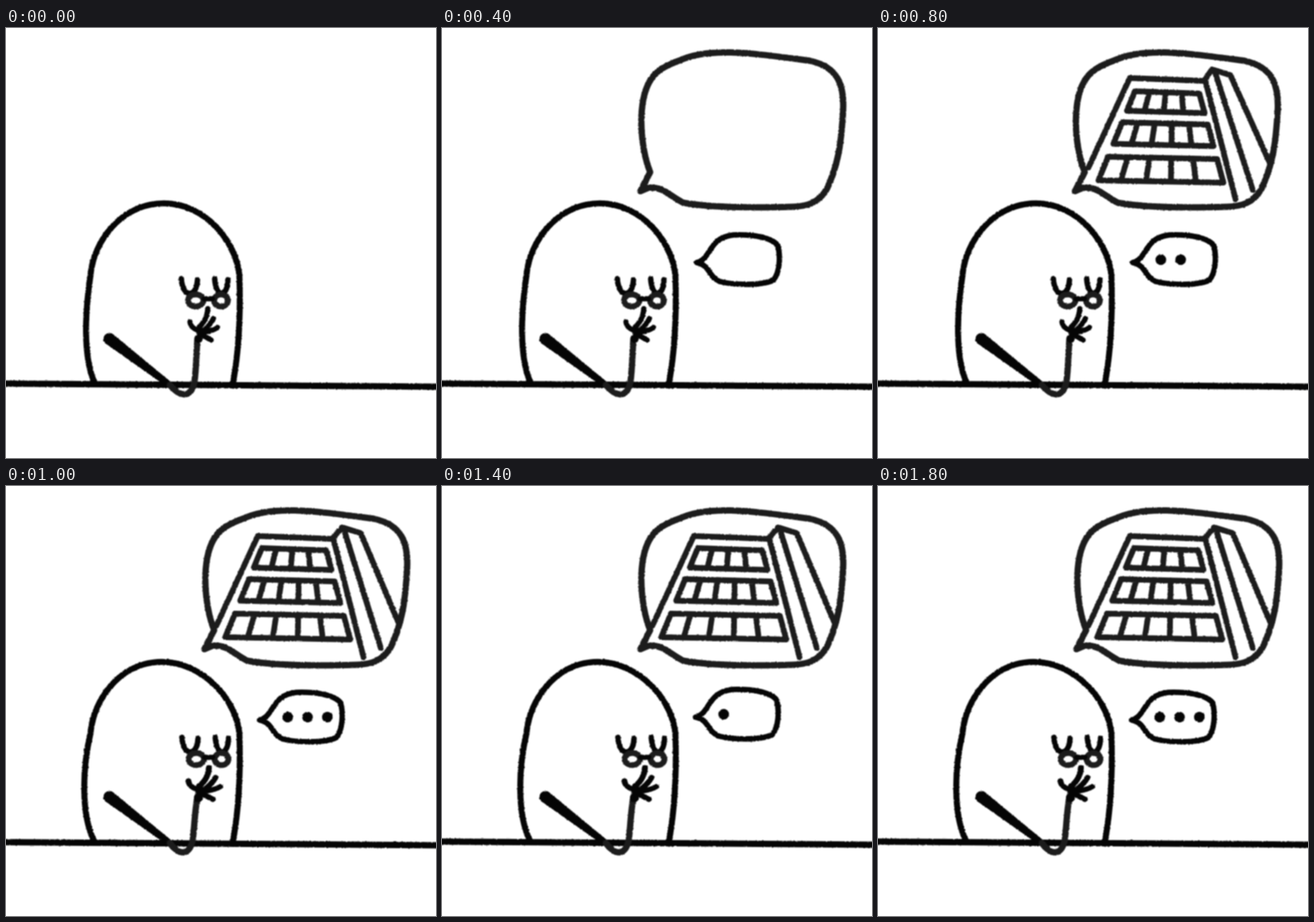
An HTML page that plays this animation: 748 by 748 pixels, repeating every 2000 ms.

```html
<!DOCTYPE html>
<html lang="en">
<head>
<meta charset="utf-8">
<title>Thinking at the table</title>
<style>
  html, body { margin: 0; width: 100%; height: 100%; overflow: hidden; background: #fff; }
  svg { display: block; width: 100vw; height: 100vh; }
  #ink { fill: none; stroke-linecap: round; stroke-linejoin: round; }
</style>
</head>
<body>
<svg viewBox="0 0 748 748">
  <filter id="rough" filterUnits="userSpaceOnUse" x="-20" y="-20" width="788" height="788" color-interpolation-filters="sRGB">
    <feTurbulence type="fractalNoise" baseFrequency=".35" seed="4"/>
    <feDisplacementMap in="SourceGraphic" scale="3" xChannelSelector="R" yChannelSelector="G"/>
    <feGaussianBlur stdDeviation=".8"/>
  </filter>
  <g id="ink" filter="url(#rough)"></g>
</svg>
<script>
const STEP = 200, STEPS = 10;
const BLACK = '#050505', SOFT = '#1c1c1c';

const stroke = (d, width, color = BLACK) => `<path d="${d}" stroke-width="${width}" stroke="${color}"/>`;
const dot = (x, y, r) => `<circle cx="${x}" cy="${y}" r="${r}" fill="${BLACK}"/>`;
const group = (transform, content) => `<g transform="${transform}">${content}</g>`;
const mix = (a, b, t) => a + (b - a) * t;
const range = n => [...Array(n).keys()];

// The figure alternates between two slightly different poses, 0 and 1.
function body(pose) {
  return stroke(`M${154 - pose} 617C${133 - 3 * pose} 570 ${138 - 5 * pose} 490 147 430
    C152 372 ${200 - 2 * pose} ${305 + pose} ${275 - 4 * pose} ${305 + pose}
    C${345 - 4 * pose} ${305 + pose} 400 370 406 430C408 490 406 560 394 622`, 10.5);
}

function face(pose) {
  const lash = (x, w) => stroke(`M${x} 436C${x + 2} 470 ${x + w - 1} 470 ${x + w} 438`, 9.5);
  const lens = (x, rx) => `<ellipse cx="${x}" cy="474" rx="${rx}" ry="10.5" stroke-width="10" stroke="${SOFT}"/>`;
  return group(`translate(${pose - 1} ${pose})`,
    lash(306, 28) + lash(364, 23) + lens(331, 13.5) + lens(375, 12) + stroke('M346 471H360', 9));
}

function arm(pose) {
  const taper = range(30).map(i => i / 29)
    .map(t => dot(mix(180, 285, t), mix(541, 621, t), mix(10.5, 5.5, t))).join('');
  const bend = 3 * pose;
  return taper + stroke(`M285 621C${303 - bend} 642 ${322 - bend} 645 ${328 - bend} 615
    C${331 - bend} 590 ${331 - bend} 570 333 540`, 11, SOFT);
}

function hand(pose) {
  const fingers = 'M320 511Q321 523 340 528M351 488Q350 508 336 520M361 505Q356 516 344 526M368 521Q360 527 340 530M357 543L340 533';
  return group(`translate(338 ${2 * pose}) scale(${1 + .15 * pose} 1) translate(-338 0)`,
    stroke(fingers, 9) + dot(340, 530, 9) + dot(335, 541, 7));
}

function bigBubble(variant) {
  return group(`translate(${variant ? 0 : -2.5} 0)`, stroke(`M362 251C350 220 342 170 350 125C358 85 375 70 412 57
    C465 32 540 44 640 57C690 68 702 100 697 155C694 200 690 235 670 279
    C655 305 635 310 610 311C540 313 470 313 420 304C395 292 385 275 359 278L345 284Z`, 11, SOFT));
}

// Rows of windows widen and grow towards the bottom, as seen in perspective.
function windowRow(i) {
  const top = 108 + 51 * i + 3 * i * i, bottom = top + 34 + 3.5 * i;
  const left = y => 445 - (y - 108) * .41, right = y => 557 + (y - 108) * .27;
  const panes = i ? 5 : 4;
  const at = (y, t) => `${mix(left(y), right(y), t)} ${y + 4 * t}`;
  const frame = `M${at(top, 0)}L${at(top, 1)}L${at(bottom, 1)}L${at(bottom, 0)}Z`;
  const bars = range(panes - 1).map(k => (k + .9) / panes).map(t => `M${at(top, t)}L${at(bottom, t)}`);
  return stroke(frame + bars.join(''), 10, SOFT);
}

function building(variant) {
  const lean = variant ? 0 : 4;
  const outline = `M366 243L438 87L567 92L${585 - lean} 72L${617 - lean} 82L682 236
    M570 94L622 298M${588 - lean / 2} 76L652 282`;
  return stroke(outline, 10, SOFT) +
    group(`translate(${lean / 2} ${lean / 2})`, range(3).map(windowRow).join(''));
}

function smallBubble(dots, x, y) {
  const outline = `M441 407C468 400 460 364 505 359C535 358 570 362 582 377
    C587 395 586 425 574 438C550 448 505 446 481 440C460 430 465 412 441 407Z`;
  return group(`translate(${x} ${y})`,
    stroke(outline, 9.5) + range(dots).map(i => dot(490 + 34.5 * i, 402, 9.3)).join(''));
}

function scene(step) {
  const pose = step % 2;
  const late = step > 6;
  const drop = (step + late) % 2;
  let out = stroke(`M-10 ${618.5 + drop}L758 ${624 + drop}`, 11) + body(pose) + face(pose) + arm(pose) + hand(pose);
  if (step < 2) return out;

  const dots = (step - 2) % 4;
  const variant = dots === 2 ? 0 : 1;
  const lift = late ? dots % 3 * 5 : 0;
  out += bigBubble(variant) + smallBubble(dots, (1 - pose) * (2 + lift / 2), 1 - pose - lift);
  return dots ? out + building(variant) : out;
}

const ink = document.getElementById('ink');
let shown = -1;
function draw() {
  const step = Math.floor(performance.now() / STEP) % STEPS;
  if (step !== shown) ink.innerHTML = scene(shown = step);
  requestAnimationFrame(draw);
}
draw();
</script>
</body>
</html>
```
